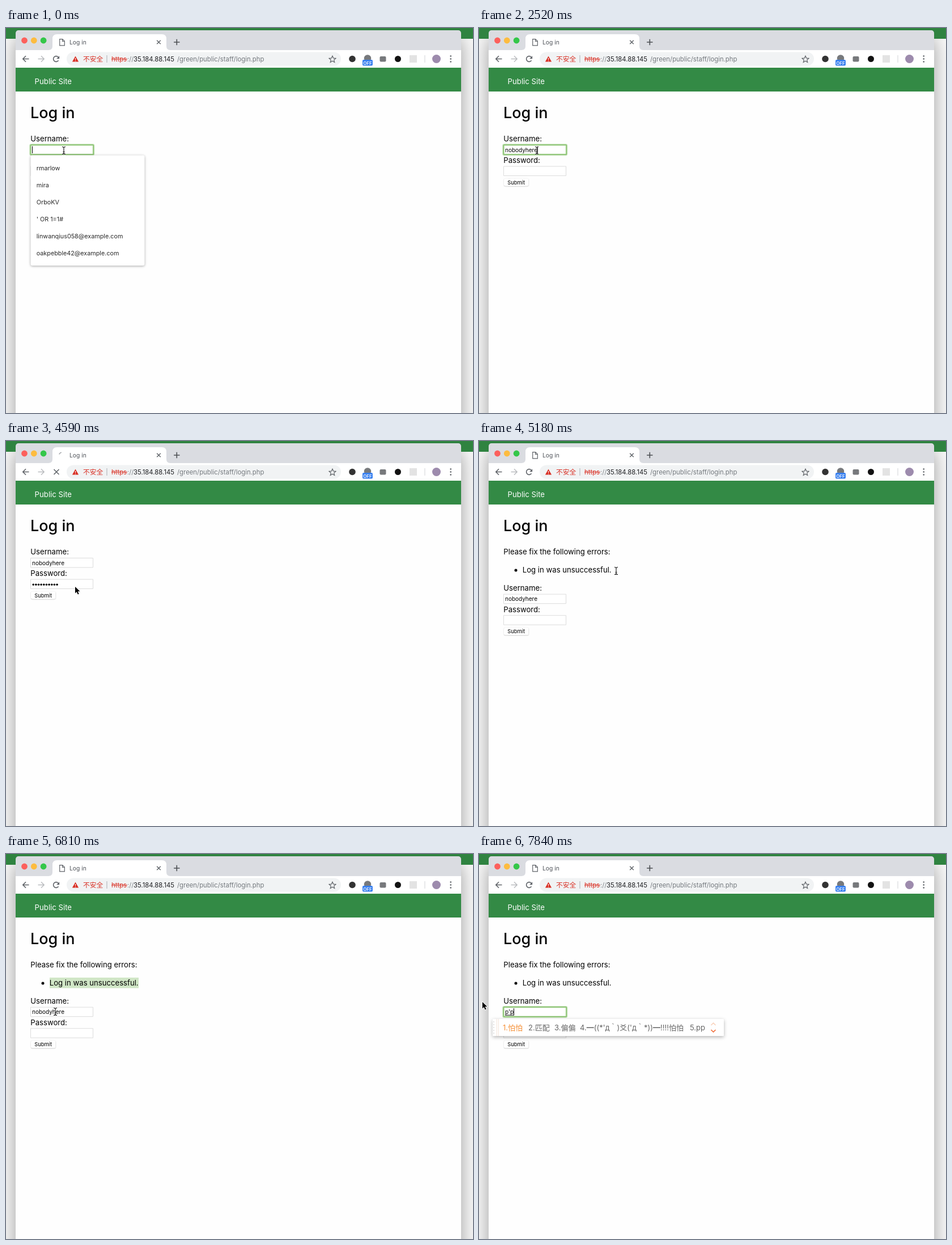
An HTML page with a canvas that plays this animation: 824 by 679 pixels, repeating every 7990 ms.

```html
<!DOCTYPE html>
<html lang="en">
<head>
<meta charset="utf-8">
<title>Log in</title>
<style>
  html, body { margin: 0; width: 100%; height: 100%; overflow: hidden; background: #fff; }
  canvas { display: block; }
</style>
</head>
<body>
<canvas id="stage" width="824" height="679"></canvas>
<script>
const ctx = document.getElementById('stage').getContext('2d');
const LOOP = 7990, STEP = 148;
const FONT = 'Inter, "Noto Sans CJK SC", sans-serif';
const LOGIN = 'nobodyhere';
const SUGGESTIONS = ['rmarlow', 'mira', 'OrboKV', "' OR 1=1#",
  'linwanqius058@example.com', 'oakpebble42@example.com'];
const CANDIDATES = [[42, '1.怕怕'], [87, '2.匹配'], [133, '3.偏偏'],
  [178, "4.━((*'д｀)爻('д｀*))━!!!!怕怕"], [372, '5.pp']];

// [step, value]: the last entry reached applies
const TYPED = [[0, 0], [7, 1], [8, 2], [9, 4], [11, 5], [13, 6], [16, 8], [17, 10]];
const DOTS = [[0, 0], [19, 2], [20, 4], [21, 6], [22, 8], [23, 10]];
// [step, x, y]: pointer path
const PATH = [[0, 102, 216], [23, 102, 216], [24, 73, 262], [25, 55, 290], [26, 30, 295],
  [28, 64, 271], [29, 64, 271], [31, 122, 257], [32, 150, 250], [35, 242, 229], [36, 238, 229],
  [40, 89, 229], [41, 40, 238], [42, 6, 255], [43, 25, 300], [44, 60, 318], [46, 87, 278],
  [47, 112, 279], [48, 50, 272], [49, 8, 262], [53, 6, 261]];

const reached = (list, k) => list.filter(e => e[0] <= k).pop()[1];
const within = (k, from, to) => k >= from && k <= to;

function pointerAt(k) {
  const i = PATH.findIndex(p => p[0] >= k);
  const b = PATH[i], a = PATH[Math.max(0, i - 1)];
  const u = (k - a[0]) / (b[0] - a[0] || 1);
  return [a[1] + (b[1] - a[1]) * u, a[2] + (b[2] - a[2]) * u];
}

function text(str, x, y, size, color = '#000', weight = 400, align = 'left') {
  ctx.font = `${weight} ${size}px ${FONT}`;
  ctx.fillStyle = color;
  ctx.textAlign = align;
  ctx.fillText(str, x, y);
  return ctx.measureText(str).width;
}

function rect(x, y, w, h, color) {
  ctx.fillStyle = color;
  ctx.fillRect(x, y, w, h);
}

function box(x, y, w, h, r, fill, stroke, width = 1) {
  ctx.beginPath();
  ctx.roundRect(x, y, w, h, r);
  if (fill) { ctx.fillStyle = fill; ctx.fill(); }
  if (stroke) { ctx.strokeStyle = stroke; ctx.lineWidth = width; ctx.stroke(); }
}

function circle(x, y, r, color) {
  ctx.fillStyle = color;
  ctx.beginPath();
  ctx.arc(x, y, r, 0, Math.PI * 2);
  ctx.fill();
}

function path(d, color, width, x = 0, y = 0, fill) {
  const p = new Path2D(d);
  ctx.save();
  ctx.translate(x, y);
  if (fill) { ctx.fillStyle = fill; ctx.fill(p); }
  if (color) { ctx.strokeStyle = color; ctx.lineWidth = width; ctx.stroke(p); }
  ctx.restore();
}

function shadowed(color, blur, dy, draw) {
  ctx.save();
  ctx.shadowColor = color;
  ctx.shadowBlur = blur;
  ctx.shadowOffsetY = dy;
  draw();
  ctx.restore();
}

function drawWindow() {
  rect(0, 0, 824, 679, '#fafafa');
  shadowed('rgba(0,0,0,.38)', 34, 14, () => box(17, 4, 786, 720, [5, 5, 0, 0], '#dadce1'));
  // strip of the window behind, left free around the front one
  rect(0, 0, 824, 4, '#2f8340');
  rect(0, 0, 17, 19, '#2f8340');
  rect(803, 0, 21, 19, '#2f8340');
  rect(17, 4, 5, 5, '#2f8340');
  rect(798, 4, 5, 5, '#2f8340');
  box(17, 4, 786, 60, [5, 5, 0, 0], '#dadce1');
  rect(17, 39, 786, 31, '#fff');
  rect(17, 70, 786, 42, '#338a45');
  rect(17, 112, 786, 567, '#fefefe');
  ['#fc605c', '#fdbc40', '#34c749'].forEach((c, i) => circle(32.5 + i * 16.8, 22, 5.4, c));
  path('M75 39q7 0 7-7V19q0-8 8-8h185q8 0 8 8v13q0 7 7 7z', null, 0, 0, 0, '#fff');
}

function drawToolbar(loading, k) {
  const ink = '#5f6368';
  if (loading) {
    ctx.strokeStyle = '#9a9da1';
    ctx.lineWidth = 1.3;
    ctx.beginPath();
    const a = 3.5 + (k - 31) * -0.9;
    ctx.arc(99, 25.5, 5.6, a, a + 1);
    ctx.stroke();
    path('M-4.5-4.5l9 9m0-9l-9 9', ink, 1.6, 89, 54.5);
  } else {
    path('M94.7 19.7h5l3.6 3.6v7.5h-8.6zM99.5 19.7v3.8h3.8', ink, 1.2);
    path('M4 2.8A4.9 4.9 0 1 1 3.5-3.4', ink, 1.6, 88.5, 54.5);
    path('M5.3-5.3v5h-5z', null, 0, 88.8, 54.5, ink);
  }
  text('Log in', 112, 29, 10.3, '#50545a');
  path('M-3.3-3.3l6.6 6.6m0-6.6l-6.6 6.6', ink, 1.4, 269.5, 25);
  path('M-5.2 0h10.4M0-5.2v10.4', '#4c4f53', 1.6, 301.3, 25);
  path('M5.5 0h-10.5M0-5.2l-5.2 5.2l5.2 5.2', ink, 1.6, 35, 54.5);
  path('M-5.5 0h10.5M0-5.2l5.2 5.2l-5.2 5.2', '#b9bbbe', 1.4, 62, 54.5);

  box(107, 42.5, 484, 24, 12, '#f1f3f4');
  path('M122.5 49.5l5.6 10h-11.2z', null, 0, 0, 0, '#d93025');
  path('M122.5 53v3m0 1.2v1.2', '#fff', 1.1);
  text('不安全', 136, 59, 11.8, '#d93025');
  rect(177.5, 48, 1, 13, '#a9acb0');
  text('https', 186, 59, 11.35, '#d93025');
  rect(186, 54.5, 28, 1, '#d93025');
  text('://', 214, 59, 11.35, '#80868b');
  text('35.184.88.145', 225, 59, 11.35, '#202124');
  text('/green/public/staff/login.php', 302, 59, 11.35, '#74797e');
  path('M0-5.8l1.7 3.9 4.2.4-3.2 2.8 1 4.1L0 3.2l-3.7 2.2 1-4.1-3.2-2.8 4.2-.4z', ink, 1.2, 576, 55);

  circle(611, 54.5, 5.8, '#333');
  circle(638, 53.5, 6.3, '#77797c');
  box(629, 56, 18, 10.5, 2, '#3b82f0');
  text('OFF', 638, 64.5, 8, '#fff', 500, 'center');
  box(659.5, 50, 11, 9.5, 2, '#77797c');
  circle(691.5, 54.5, 5.5, '#111');
  rect(712, 48, 13, 13, '#e3e3e3');
  rect(738.5, 48, 1, 13, '#d2d3d5');
  circle(759.5, 54.5, 7.5, '#9d8bad');
  [49.5, 54.5, 59.5].forEach(y => circle(784.7, y, 1.35, ink));
}

function drawField(y, focused) {
  box(43.5, y + .5, 110, 16.5, 0, '#fff', '#dcdcdc');
  if (focused) {
    box(43, y, 111.5, 17.5, 1.5, '#fff', 'rgba(140,198,116,.45)', 3.6);
    box(43.3, y + .2, 111, 17, 1, null, '#8cc373', 1.8);
  }
}

function drawForm(dy, s) {
  const y = 206 + dy;
  text('Username:', 43.3, y - 6, 13.15);
  drawField(y, s.focus === 'name');
  if (s.marked) rect(46, y + 2, s.marked, 14, '#d0e6c6');
  const w = text(s.name, 46, y + 12.7, 10);
  if (s.composing) rect(46, y + 14, w, 1, '#000');
  if (s.focus === 'name' && s.caret) rect(46 + Math.round(w), y + 2.5, 1, 12.5, '#000');

  text('Password:', 43.3, y + 32, 13.15);
  drawField(y + 37.5, s.focus === 'pass');
  for (let i = 0; i < s.dots; i++) circle(48.2 + i * 4.65, y + 47.3, 1.75, '#000');
  if (s.focus === 'pass') rect(46 + Math.round(s.dots * 4.6), y + 40.5, 1, 12.5, '#000');

  shadowed('rgba(0,0,0,.3)', 1.5, .5, () => box(44, y + 59.3, 43.5, 13.5, 2.5, '#fff'));
  text('Submit', 65.6, y + 69.6, 9.4, '#000', 400, 'center');
}

function drawErrors(selectFrom) {
  text('Please fix the following errors:', 43.3, 200, 13.15);
  if (selectFrom) rect(selectFrom, 218, 234 - selectFrom, 18.5, '#d0e6c6');
  circle(65, 228, 2.5, '#000');
  text('Log in was unsuccessful.', 76.8, 232, 13.15);
}

function drawSuggestions() {
  shadowed('rgba(0,0,0,.35)', 4, 1, () => box(43.5, 224.5, 201, 194.5, 3, '#fff'));
  SUGGESTIONS.forEach((s, i) => text(s, 53.7, 250.5 + i * 30.15, 10.8, '#2a2a2a'));
}

function drawCandidates() {
  shadowed('rgba(0,0,0,.3)', 6, 2, () => box(24, 291, 408, 30, 1, '#fff'));
  for (let y = 296; y < 320; y += 5) circle(26, y, .9, '#d5d5d5');
  rect(31, 291, 1, 30, '#f3e3d8');
  rect(34, 291, 1, 30, '#f3e3d8');
  CANDIDATES.forEach(([x, s], i) => text(s, x, 311, 13, i ? '#666' : '#f58f35'));
  path('M-4 2l4-4 4 4', '#f9cdb4', 1.3, 413.5, 300);
  path('M-4-2l4 4 4-4', '#f0632c', 1.5, 413.5, 312);
}

function drawPointer(x, y, beam) {
  if (beam) {
    const d = 'M-3-6.5q3 0 3 2v9q0 2 3 2M3-6.5q-3 0-3 2v9q0 2-3 2M-1.5 2.5h3';
    path(d, 'rgba(255,255,255,.7)', 2.4, x, y);
    path(d, '#111', 1.1, x, y);
  } else {
    path('M0 0v11.5l2.7-2.5 2 4.6 2-.9-2-4.4h3.8z', '#fff', 1.6, x, y, '#000');
    path('M0 0v11.5l2.7-2.5 2 4.6 2-.9-2-4.4h3.8z', null, 0, x, y, '#000');
  }
}

function draw(time) {
  const k = Math.floor((time % LOOP + 5) / STEP);
  const [x, y] = pointerAt(k);
  const failed = k >= 33;
  const composing = k >= 51;

  const state = {
    name: composing ? (k === 51 ? 'p' : "p'p") : LOGIN.slice(0, reached(TYPED, k)),
    dots: failed ? 0 : reached(DOTS, k),
    focus: k < 18 || k >= 47 ? 'name' : k < 29 ? 'pass' : '',
    caret: !within(k, 1, 3) && !within(k, 48, 50),
    marked: within(k, 48, 50) ? 57 : 0,
    composing
  };

  drawWindow();
  drawToolbar(within(k, 29, 32), k);
  text('Public Site', 50.6, 98.7, 13.2, '#fff');
  text('Log in', 43, 158.5, 27, '#000', 500);
  if (failed) drawErrors(within(k, 36, 46) && (k > 40 ? 77 : Math.max(77, x + 4)));
  drawForm(failed ? 63.7 : 0, state);
  if (k < 7) drawSuggestions();
  if (composing) drawCandidates();
  drawPointer(x, y, k < 25 || within(k, 35, 40) || within(k, 44, 48));
}

function tick() {
  draw(performance.now());
  requestAnimationFrame(tick);
}
tick();
</script>
</body>
</html>
```
